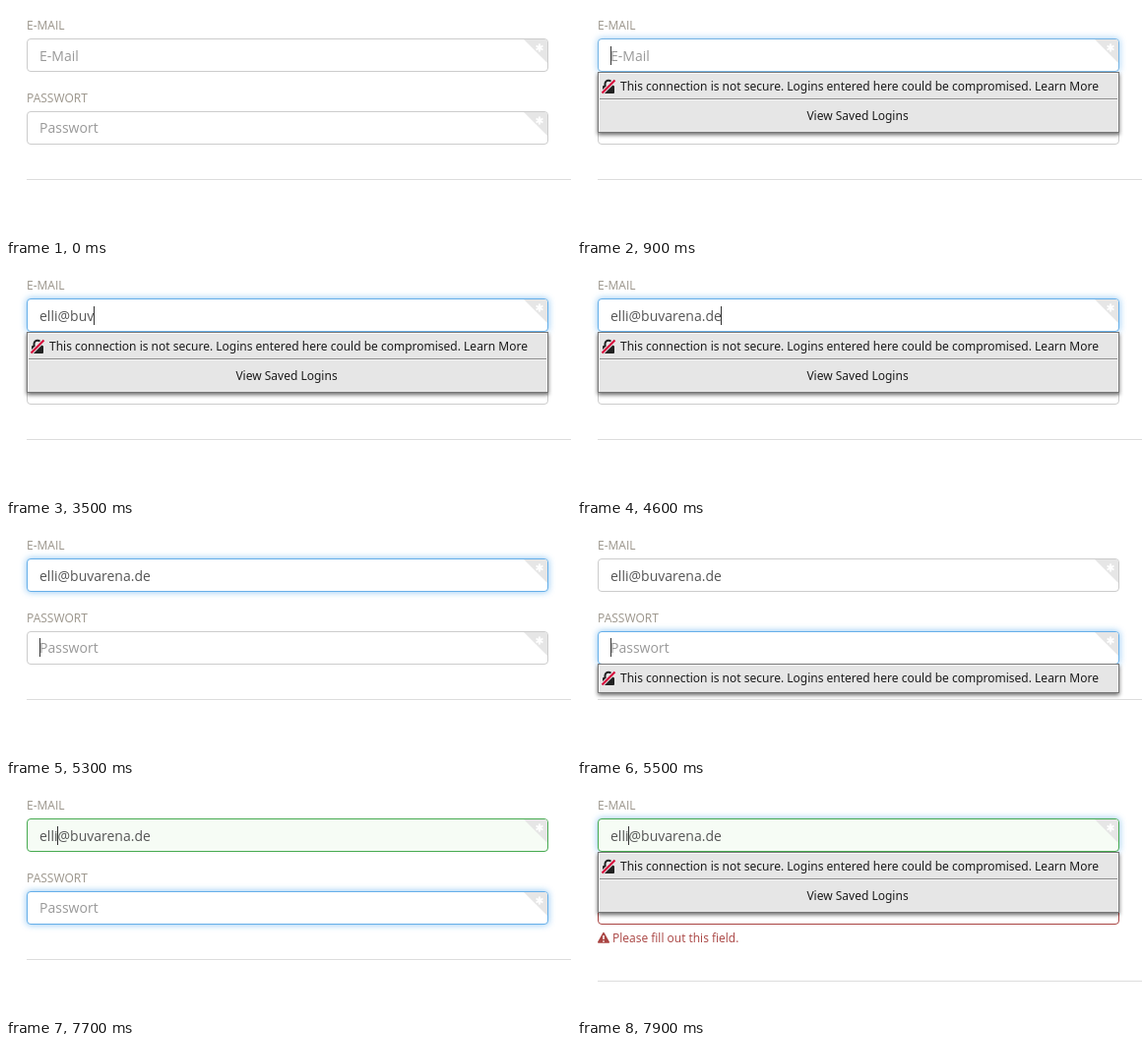
Recreate the animation shown at these times as an HTML page. Size 574x236 px, loop 8 s.

```html
<!DOCTYPE html>
<html lang="de">
<head>
<meta charset="utf-8">
<title>Login form</title>
<style>
html, body { margin: 0; width: 100%; height: 100%; overflow: hidden; background: #fff; }
svg { display: block; width: 574px; height: 236px; }
text { font-family: "Open Sans", sans-serif; font-size: 14px; }
.label { font-size: 12px; fill: #9b958b; }
.hint { fill: #999; }
.typed { fill: #555; }
.popup text { font-family: "Noto Sans", sans-serif; font-size: 12px; fill: #1c1c1c; }
.error text { font-size: 12px; fill: #a94442; }
</style>
</head>
<body>
<svg viewBox="0 0 574 236" xmlns="http://www.w3.org/2000/svg">
  <defs>
    <filter id="glow" filterUnits="userSpaceOnUse" x="0" y="-20" width="574" height="80">
      <feGaussianBlur stdDeviation="3.6"/>
    </filter>
    <filter id="shade" filterUnits="userSpaceOnUse" x="0" y="-20" width="574" height="120">
      <feGaussianBlur stdDeviation="2.2"/>
    </filter>
    <clipPath id="below"><rect y="0" width="574" height="100"/></clipPath>
    <g id="corner">
      <path d="M526 1H547.5Q550 1 550 3.5V25Z" fill="#e6e6e6"/>
      <path d="M542 5.6V13.4M538.6 7.5L545.4 11.5M545.4 7.5L538.6 11.5" stroke="#fff" stroke-width="2"/>
    </g>
  </defs>
  <rect width="574" height="236" fill="#fff"/>
  <text class="label" x="21" y="24">E-MAIL</text>
  <text class="label" x="21" y="98">PASSWORT</text>
  <rect id="rule" x="21" width="553" height="1" fill="#ddd"/>
  <g class="error" id="error">
    <path d="M27 149.6L32.2 159H21.8Z" fill="#a94442" stroke="#a94442" stroke-width="1.6" stroke-linejoin="round"/>
    <path d="M27 152V156M27 157.2V158.8" stroke="#fff" stroke-width="1.5"/>
    <text x="36" y="159">Please fill out this field.</text>
  </g>
  <g id="fields"></g>
  <g class="popup" id="popup">
    <g clip-path="url(#below)">
      <rect class="frame" x="21" y="2" width="530" fill="#000" opacity=".6" filter="url(#shade)"/>
    </g>
    <rect class="frame" x="21" width="530" fill="#777"/>
    <rect class="inner" x="22" y="1" width="528" fill="#f6f6f6"/>
    <rect class="face" x="23" y="2" width="526" fill="#e6e6e6"/>
    <path d="M28.5 15V12.2a3.5 3.5 0 0 1 7 0V15" fill="none" stroke="#222" stroke-width="2"/>
    <rect x="26" y="14" width="12" height="8" rx="1" fill="#222"/>
    <path d="M25.5 21.5L38.5 8.5" stroke="#e6e6e6" stroke-width="4"/>
    <path d="M25.5 21.5L38.5 8.5" stroke="#d70c3c" stroke-width="2.2"/>
    <text x="44" y="19">This connection is not secure. Logins entered here could be compromised. Learn More</text>
    <g id="saved">
      <rect x="23" y="27" width="526" height="1" fill="#8c8c8c"/>
      <rect x="23" y="28" width="526" height="1" fill="#f4f4f4"/>
      <text x="285" y="49" text-anchor="middle">View Saved Logins</text>
    </g>
  </g>
</svg>
<script>
const LOOP = 8000, STEP = 50;
const ADDRESS = "elli@buvarena.de";
const KEYS = [1750, 1950, 2200, 2300, 3000, 3200, 3450, 3500,
  3650, 3750, 3850, 4050, 4150, 4400, 4550, 4600];
const GREY = [204, 204, 204], BLUE = [102, 175, 233], GREEN = [70, 170, 80],
  RED = [169, 68, 66], WHITE = [255, 255, 255], MINT = [246, 252, 245];

const $ = id => document.getElementById(id);
const show = (el, on) => el.setAttribute("visibility", on ? "inherit" : "hidden");
const mix = (a, b, p) => a.map((v, i) => v + (b[i] - v) * p);
const rgb = c => `rgb(${c.map(Math.round).join(",")})`;

function ramp(t, from, to) {
  const p = Math.min(1, Math.max(0, (t - from) / (to - from)));
  return p * p * (3 - 2 * p);
}

function makeField(y, base, hint) {
  const g = document.createElementNS("http://www.w3.org/2000/svg", "g");
  g.setAttribute("transform", `translate(0 ${y})`);
  g.innerHTML = `
    <rect x="21" y="0" width="530" height="34" rx="4" fill="rgb(82,168,236)" filter="url(#glow)"/>
    <rect x="21.5" y=".5" width="529" height="33" rx="3.5"/>
    <use href="#corner"/>
    <text class="hint" x="34" y="${base}">${hint}</text>
    <text class="typed" x="34" y="${base}"></text>
    <rect y="${base - 15}" width="1" height="19" fill="#333"/>`;
  $("fields").append(g);
  const [glow, box, , ghost, typed, caret] = g.children;
  return { glow, box, ghost, typed, caret };
}

const mail = makeField(33, 23, "E-Mail");
const pass = makeField(107, 22, "Passwort");

// at: caret index, or -1 when the caret is off
function setField(f, { glow, border, fill, value, at, blink = 1 }) {
  f.glow.setAttribute("opacity", glow * .7);
  f.box.setAttribute("stroke", rgb(border));
  f.box.setAttribute("fill", rgb(fill));
  if (f.typed.textContent !== value) f.typed.textContent = value;
  show(f.ghost, !value);
  show(f.caret, at >= 0);
  const w = at > 0 ? f.typed.getSubStringLength(0, at) : 0;
  f.caret.setAttribute("x", Math.floor(34 + w));
  f.caret.setAttribute("opacity", blink);
}

function setPopup(y, tall) {
  const popup = $("popup");
  show(popup, y > 0);
  if (!y) return;
  const h = tall ? 62 : 30;
  popup.setAttribute("transform", `translate(0 ${y})`);
  popup.querySelectorAll(".frame").forEach(r => r.setAttribute("height", h));
  popup.querySelector(".inner").setAttribute("height", h - 2);
  popup.querySelector(".face").setAttribute("height", h - 3);
  show($("saved"), tall);
}

function draw(t) {
  const count = KEYS.filter(k => k <= t).length;
  const enter = ramp(t, 750, 950), leave = ramp(t, 5300, 5500);
  const valid = ramp(t, 5700, 5950), back = ramp(t, 7700, 7900);
  const mailGlow = enter * (1 - leave) + back;
  let mailAt = -1;
  if (t >= 800 && t < 5300) mailAt = count;
  if (t >= 7700) mailAt = 4;

  setField(mail, {
    glow: mailGlow,
    border: mix(mix(GREY, BLUE, enter * (1 - leave)), GREEN, valid),
    fill: mix(WHITE, MINT, valid),
    value: ADDRESS.slice(0, count),
    at: mailAt
  });

  const passOn = leave * (1 - back);
  setField(pass, {
    glow: passOn,
    border: mix(mix(GREY, BLUE, leave), RED, back),
    fill: WHITE,
    value: "",
    at: t >= 5300 && t < 6550 ? 0 : -1,
    blink: t >= 6500 ? .5 : 1
  });

  if ((t >= 850 && t < 5300) || t >= 7750) setPopup(67, true);
  else if (t >= 5350 && t < 7700) setPopup(140, false);
  else setPopup(0, false);

  const failed = t >= 7750;
  show($("error"), failed);
  $("rule").setAttribute("y", failed ? 198 : 176);
}

const start = performance.now();
function tick() {
  const t = (performance.now() - start) % LOOP;
  draw(Math.floor(t / STEP) * STEP);
  requestAnimationFrame(tick);
}
tick();
</script>
</body>
</html>
```
